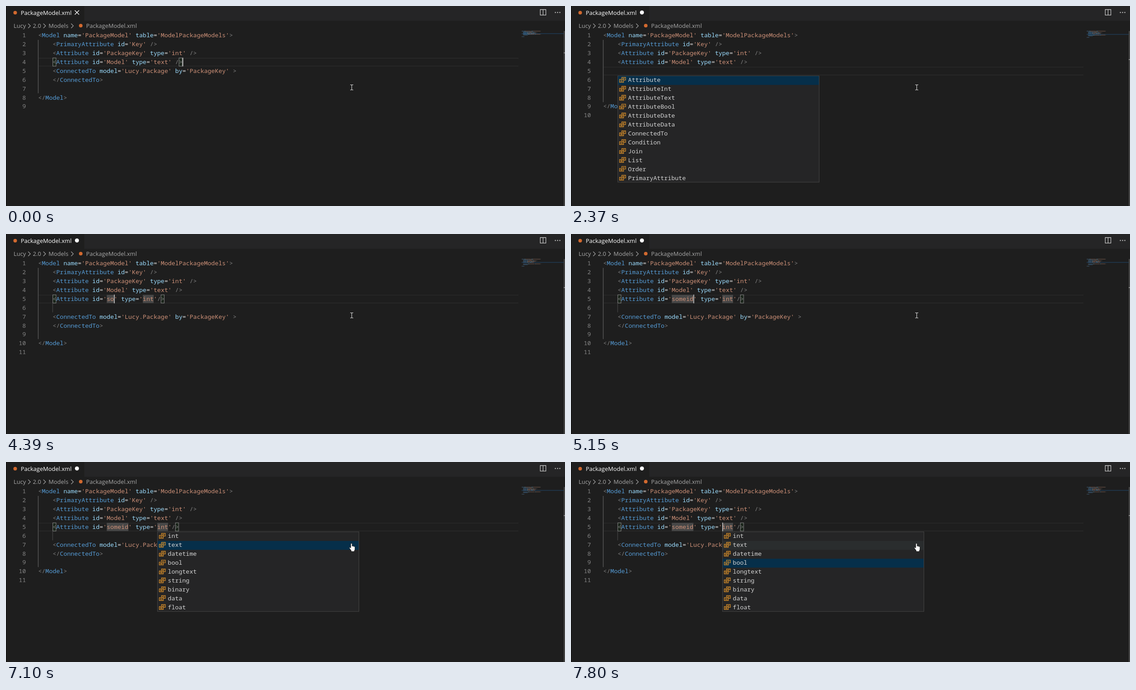
An HTML page that plays this animation: 1249x448 px, repeating every 8000 ms.

```html
<!DOCTYPE html>
<html lang="en">
<head>
<meta charset="utf-8">
<title>Editing an XML model</title>
<style>
html, body { margin: 0; width: 100%; height: 100%; overflow: hidden; background: #1e1e1e; }
svg { display: block; }
text { white-space: pre; }
.mono { font: 500 13.43px "Noto Sans Mono", monospace; }
.ui { font: 13px "Open Sans", sans-serif; }
</style>
</head>
<body>
<svg id="stage" width="1249" height="448" viewBox="0 0 1249 448"></svg>
<script>
const LOOP = 8000, LEFT = 72, TOP = 56, CHAR = 8.058, LINE = 19.93, MINI = 1.75;
const GREY = '#808080', TAG = '#569cd6', ATTR = '#9cdcfe', STRING = '#ce9178', PLAIN = '#d4d4d4';
const BLINKS = [110, 660, 1420, 1820, 2370, 2890, 3370, 3840, 6160, 6640, 7100, 7560];
const KEYS = [4140, 4390, 4450, 4690, 4920, 5150];
const NEWLINE = 890, TAGS_OPEN = 1900, INSERT = 2890, JUMP = 5640, TYPES_OPEN = 5700;
const TAGS = ['Attribute', 'AttributeInt', 'AttributeText', 'AttributeBool', 'AttributeDate', 'AttributeData',
  'ConnectedTo', 'Condition', 'Join', 'List', 'Order', 'PrimaryAttribute'];
const TYPES = ['int', 'text', 'datetime', 'bool', 'longtext', 'string', 'binary', 'data', 'float'];
const HEAD = [
  "<Model name='PackageModel' table='ModelPackageModels'>",
  "    <PrimaryAttribute id='Key' />",
  "    <Attribute id='PackageKey' type='int' />",
  "    <Attribute id='Model' type='text' />"];
const TAIL = [
  "    <ConnectedTo model='Lucy.Package' by='PackageKey' >",
  "    </ConnectedTo>", "", "</Model>", ""];

const stage = document.getElementById('stage');
const passed = (times, t) => times.filter(time => time <= t).length;
const colX = col => LEFT + col * CHAR;
const rowY = row => TOP + row * LINE;
const miniY = row => 55.8 + row * MINI;
const escape = s => s.replace(/</g, '&lt;').replace(/>/g, '&gt;');
const rect = (x, y, w, h, fill, extra = '') =>
  `<rect x="${x}" y="${y}" width="${w}" height="${h}" fill="${fill}" ${extra}/>`;
const path = (d, stroke, width = 1, fill = 'none') =>
  `<path d="${d}" fill="${fill}" stroke="${stroke}" stroke-width="${width}"/>`;
const dot = (x, y, r, fill) => `<circle cx="${x}" cy="${y}" r="${r}" fill="${fill}"/>`;
const text = (x, y, s, fill, font = 'mono') =>
  `<text x="${x}" y="${y}" class="${font}" fill="${fill}">${s}</text>`;

function tokens(line) {
  let previous = '';
  return (line.match(/<\/?|\/?>|'[^']*'|=|[\w.]+|\s+/g) || []).map(s => {
    const color = /[<>]/.test(s) ? GREY : s[0] === "'" ? STRING : s === '=' ? PLAIN
      : previous[0] === '<' ? TAG : ATTR;
    previous = s;
    return { s, color };
  });
}

function codeLine(line, row) {
  const spans = tokens(line).map(k => `<tspan fill="${k.color}">${escape(k.s)}</tspan>`).join('');
  const number = String(row + 1);
  return text(44.5 - number.length * CHAR, rowY(row) + 14, number, '#858585') +
    text(LEFT, rowY(row) + 14, spans, PLAIN);
}

function miniLine(line, row) {
  let x = 1152;
  return tokens(line).map(k => {
    const w = k.s.length * .79, start = x;
    x += w;
    return k.s.trim() ? rect(start, miniY(row), w, 1.2, k.color, 'opacity=".42"') : '';
  }).join('');
}

function frame() {
  const chevron = x => path(`M${x - 2.5} 39.5l5 5l-5 5`, '#a9a9a9', 1.2);
  return rect(0, 0, 1249, 448, '#1e1e1e') + rect(175, 0, 1074, 33, '#252526') +
    rect(0, 0, 1, 448, '#0a0a0a') +
    dot(20.5, 15, 4, '#d2692f') + text(33, 20, 'PackageModel.xml', '#fff', 'ui') +
    path('M1193.7 8h12.6v12.4h-12.6zM1200 8v12.4', '#c5c5c5', 1.3) +
    [1227.5, 1232.5, 1237.5].map(x => dot(x, 14.5, 1.2, '#c5c5c5')).join('') +
    text(17, 49, 'Lucy', '#a9a9a9', 'ui') + chevron(52) +
    text(60, 49, '2.0', '#a9a9a9', 'ui') + chevron(86) +
    text(95, 49, 'Models', '#a9a9a9', 'ui') + chevron(148) +
    dot(167, 44, 4, '#d2692f') + text(179, 49, 'PackageModel.xml', '#a9a9a9', 'ui');
}

function popup(x, items, selected, hovered) {
  const y = rowY(5) + .8;
  return rect(x + .5, y, 450, items.length * LINE - 1, '#252526', 'stroke="#454545"') +
    items.map((item, i) => {
      const top = y + i * LINE, fill = i === selected ? '#062f4a' : i === hovered ? '#2a2d2e' : '';
      return (fill ? rect(x + 1, top + .4, 449, LINE, fill) : '') +
        path(`M${x + 9.5} ${top + 7}v-3.5h8.5v6h-4M${x + 11.5} ${top + 6}h4.5` +
          `M${x + 4.5} ${top + 8}h9v6.5h-9zM${x + 6.5} ${top + 10.3}h5M${x + 6.5} ${top + 12.3}h5`, '#e8982a', 1.2) +
        text(x + 23.6, top + 14, item, PLAIN);
    }).join('');
}

const beam = path('M769 176.5h2.5l1 1l1-1h2.5M769 188h2.5l1-1l1 1h2.5M772.5 177.5v10', '#ddd', 1.1);
const hand = path('M770.3 192.5v-9q1.5-2.6 3 0v5q1.2-1 2.2.4q1.4-.8 2.1.6q1.7-.6 2.1 1v4.5' +
  'q0 2.4-1.5 3.6v1.9h-6.8v-1.9l-4.3-6q.4-2.4 3.2-.1z', '#111', .8, '#fff');

function scene(t) {
  const dirty = t >= NEWLINE, inserted = t >= INSERT;
  const id = 'someid'.slice(0, passed(KEYS, t));
  const snippet = `    <Attribute id='${id}' type='int'/>`;
  const lines = [...HEAD, ...(inserted ? [snippet, ''] : dirty ? [''] : []), ...TAIL];
  const row = dirty ? 4 : 3, y = rowY(row), end = lines[row].length;
  const typeCol = 27 + id.length;
  const caretCol = !dirty ? end : !inserted ? 4 : t < JUMP ? 19 + id.length : typeCol;
  const word = (col, n) => rect(colX(col), y + .5, n * CHAR, 18.5, '#474747');
  const bracket = col => rect(colX(col) + .3, y + .5, 7.3, 18.5, 'rgba(0,100,0,.1)', 'stroke="#888"');
  const choosing = t >= TYPES_OPEN;
  let out = frame();

  out += dirty ? dot(158.5, 14.5, 4.5, '#fff') : path('M153.7 9.7l9.6 9.6m0-9.6l-9.6 9.6', '#fff', 1.4);
  out += path(`M73 ${y + 1.2}h1072M73 ${y + 18.8}h1072`, '#282828', 1.8);
  out += rect(LEFT - .5, rowY(1), 1, (lines.length - 3) * LINE, '#707070');
  if (inserted) {
    out += rect(colX(4) - .5, rowY(5), 1, LINE, '#505050');
    out += word(19, id.length) + word(typeCol, 3);
  }
  if (lines[row]) out += bracket(4) + bracket(end - 1);
  out += lines.map(codeLine).join('');

  out += rect(1152, miniY(row), 94, 1.6, '#203a52');
  if (!inserted) out += rect(1155, miniY(row - 2), 28, 7, '#1d3c55', 'opacity=".5"');
  out += lines.map(miniLine).join('');
  out += rect(1246, 56, 3, 392, '#424242') + rect(1246, dirty ? 119 : 104, 3, 2, '#8a8a8a');

  if (t >= TAGS_OPEN && !inserted) out += popup(104, TAGS, 0);
  if (choosing) out += popup(338, TYPES, 1 + passed([7650, 7800], t), 1);
  if (passed(BLINKS, t) % 2 === 0) out += rect(colX(caretCol), y, 1.7, 19.5, '#c8c8c8');
  return out + (choosing ? hand : beam);
}

let shown = '';
function draw(now) {
  const next = scene(Math.max(0, now - start) % LOOP);
  if (next !== shown) stage.innerHTML = shown = next;
  requestAnimationFrame(draw);
}
const start = performance.now();
draw(start);
</script>
</body>
</html>
```
